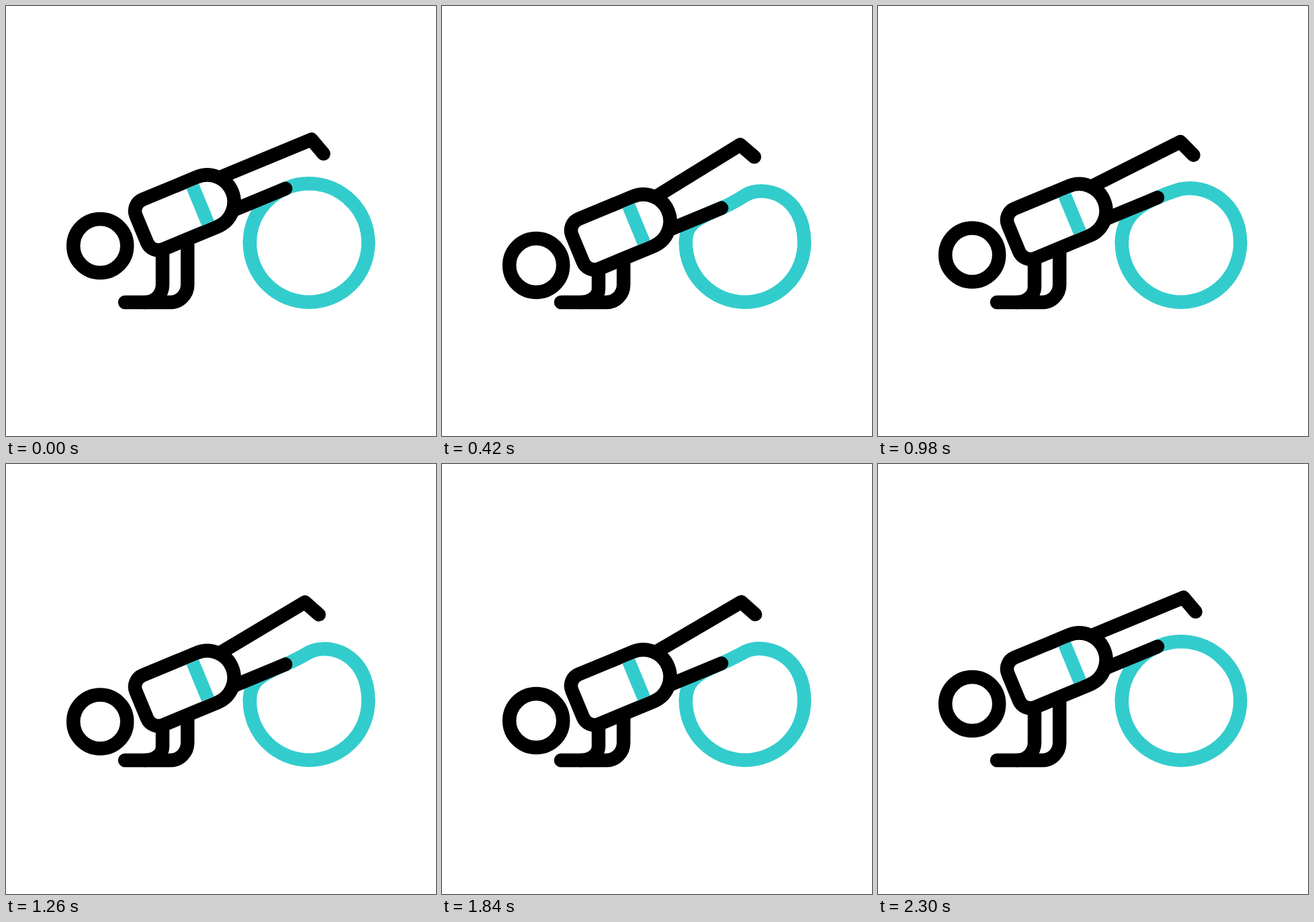
Write an HTML page without scripts that moves like this. It is 640x640 px and loops after 2400 ms.

```html
<!DOCTYPE html>
<html lang="en">
<head>
<meta charset="utf-8">
<title>Ball exercise</title>
<style>
/* depth of the push-up: 0 raised, 1 lowered */
@property --dip { syntax: "<number>"; inherits: true; initial-value: 0; }

html, body { margin: 0; width: 100%; height: 100%; overflow: hidden; background: #fff; }
svg { display: block; width: 100vw; height: 100vh; }
path, circle { fill: none; stroke: #000; stroke-width: 20.5; stroke-linecap: round; stroke-linejoin: round; }
.teal { stroke: #33cccd; }
.torso { fill: #fff; }
.belt { stroke-width: 20; stroke-linecap: butt; }

svg, .ball-top { animation: push-up 2400ms cubic-bezier(.333, 0, .667, 1) infinite; }
.body { transform: translateY(calc(var(--dip) * 29.2px)); }
.raised-leg { transform-origin: 30px -26.4px; transform: rotate(calc(var(--dip) * -9.2deg)); }
.far-arm { transform-origin: 0 441px; transform: scaleY(calc(1 - var(--dip) * .25)); vector-effect: non-scaling-stroke; }

/* three push-ups, then a short rest; d only reaches the ball */
@keyframes push-up {
  0%, 33.3%, 66.5%, 95.8%, 100% {
    --dip: 0;
    d: path("M-88.2 0C-88.2-35.7-66.7-67.8-33.7-81.5C-23-85.9-11.6-88.2 0-88.2C48.7-88.2 88.2-48.7 88.2 0");
  }
  16.7%, 49.3%, 79.9% {
    --dip: 1;
    d: path("M-88.2 0C-88.2-25.5-78-34-34-52.1C-24-56.3-11-63.5 0-70.5C27-87.5 88.2-72.5 88.2 0");
  }
}
</style>
</head>
<body>
<svg viewBox="0 0 640 640">
  <g transform="translate(451 352.5)">
    <path class="teal" d="M-88.2 0A88.2 88.2 0 0 0 88.2 0"/>
    <path class="teal ball-top"/>
  </g>
  <path class="far-arm" d="M233 355V415A26 26 0 0 1 207 441"/>
  <path d="M270.2 355V415A26 26 0 0 1 244.2 441H177"/>
  <g class="body">
    <circle cx="140.2" cy="357" r="40"/>
    <g transform="translate(299.5 291.5) rotate(-22.5)">
      <path class="raised-leg" d="M30-26.4H178.8l8.5 26.4"/>
      <path d="M31 26.3H115.3"/>
      <path class="torso" d="M0-40A40 40 0 0 1 0 40H-87.5a18.4 18.4 0 0 1-18.4-18.4V-21.6a18.4 18.4 0 0 1 18.4-18.4Z"/>
      <path class="teal belt" d="M-11.2-29.8V29.8"/>
    </g>
  </g>
</svg>
</body>
</html>
```
